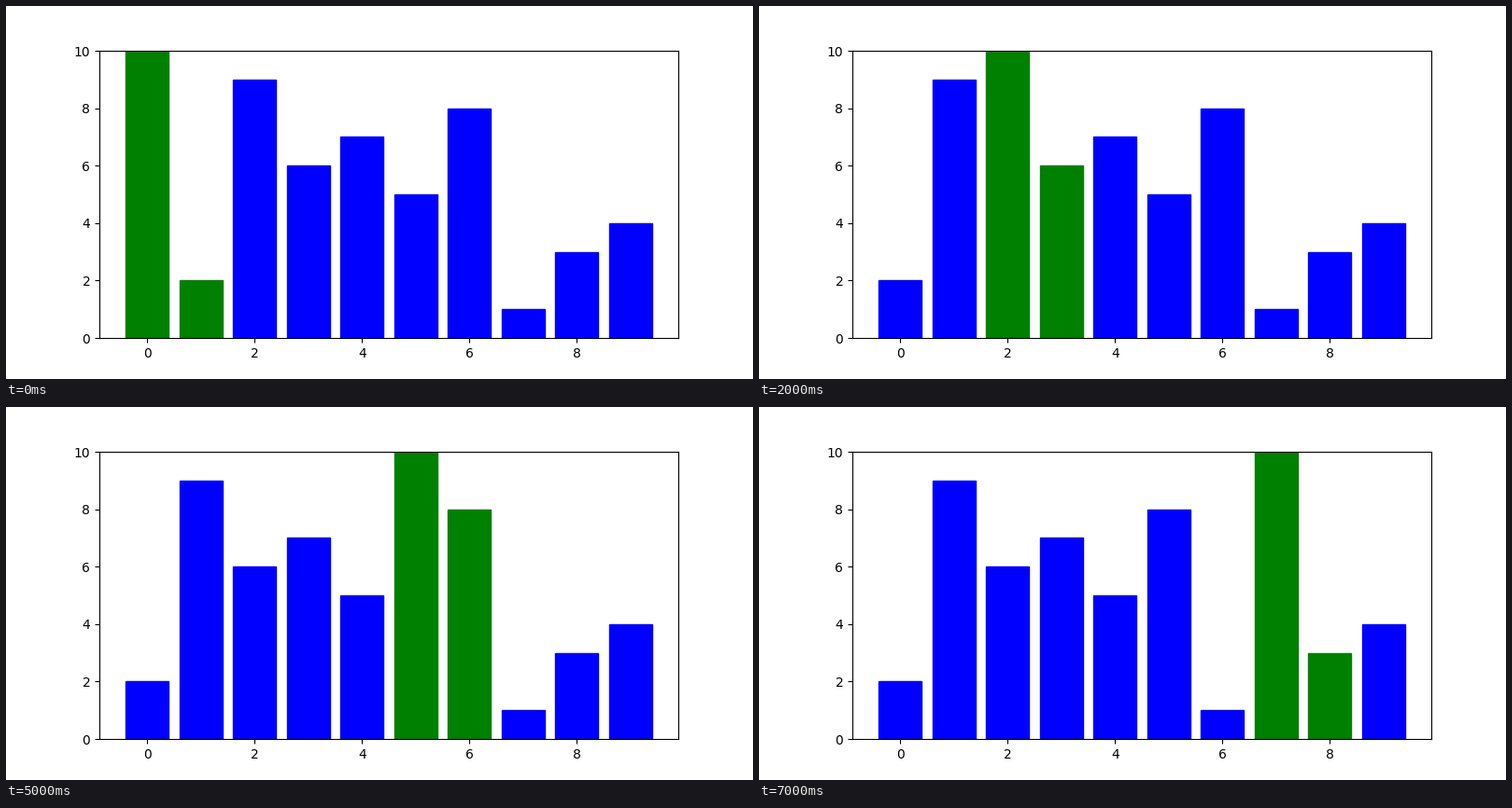
These frames come from a looping animation (800x400 px, 8 s). A matplotlib script:

```python
import matplotlib.pyplot as plt
from matplotlib.animation import FuncAnimation

VALUES = [10, 2, 9, 6, 7, 5, 8, 1, 3, 4]
STEPS = 8

fig, ax = plt.subplots(figsize=(8, 4), dpi=100)
bars = ax.bar(range(len(VALUES)), VALUES)
ax.set_ylim(0, 10)


def after_swaps(count):
    """Values after the first comparisons of a bubble sort pass."""
    vals = VALUES.copy()
    for i in range(count):
        if vals[i] > vals[i + 1]:
            vals[i], vals[i + 1] = vals[i + 1], vals[i]
    return vals


def update(step):
    for i, (bar, value) in enumerate(zip(bars, after_swaps(step))):
        bar.set_height(value)
        # set_color also colours the edge, which widens the bar slightly
        bar.set_color("green" if i in (step, step + 1) else "blue")
    return bars.patches


anim = FuncAnimation(fig, update, frames=STEPS, interval=1000,
                     repeat=True, repeat_delay=0)
plt.show()
```
